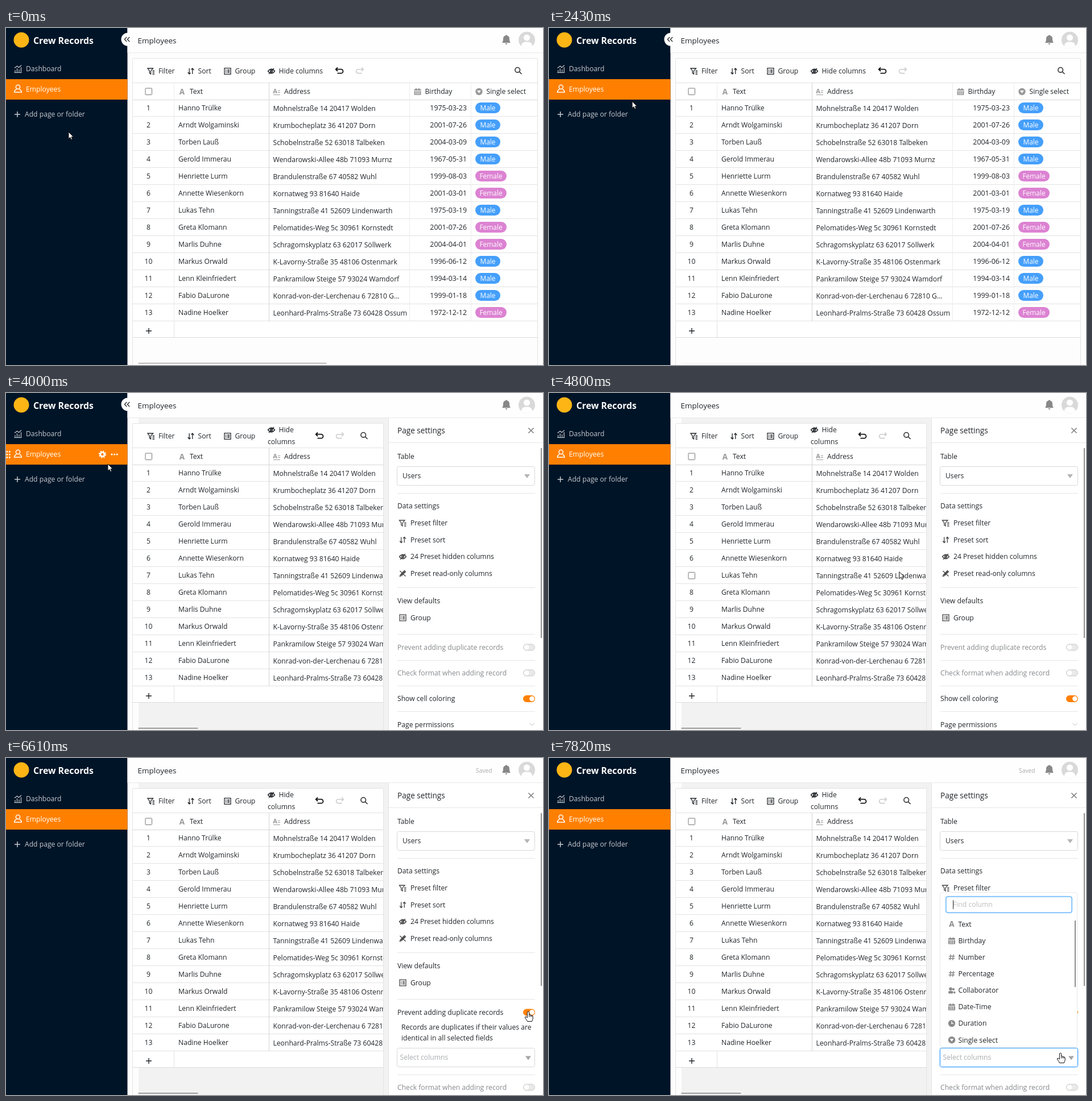
An HTML page with a canvas that plays this animation: 944x593 px, repeating every 8 s.

```html
<!DOCTYPE html>
<html lang="en">
<head>
<meta charset="utf-8">
<title>Page settings</title>
<style>
html, body { margin: 0; width: 100%; height: 100%; overflow: hidden; background: #fff; }
canvas { display: block; width: 944px; height: 593px; }
</style>
</head>
<body>
<canvas id="stage" width="944" height="593"></canvas>
<script>
const W = 944, H = 593, LOOP = 8000;
const canvas = document.getElementById('stage');
const dpr = window.devicePixelRatio || 1;
canvas.width = W * dpr;
canvas.height = H * dpr;
const c = canvas.getContext('2d');

const INK = '#212529', GREY = '#999', LINE = '#e3e3e3', ORANGE = '#ff8000', BLUE = '#2f9bff';
const FONT = '"Open Sans", "Noto Sans", sans-serif';

// name, address, birthday, gender
const ROWS = [
  ['Hanno Trülke', 'Mohnelstraße 14 20417 Wolden', '1975-03-23', 'M'],
  ['Arndt Wolgaminski', 'Krumbocheplatz 36 41207 Dorn', '2001-07-26', 'M'],
  ['Torben Lauß', 'Schobelnstraße 52 63018 Talbeken', '2004-03-09', 'M'],
  ['Gerold Immerau', 'Wendarowski-Allee 48b 71093 Murnz', '1967-05-31', 'M'],
  ['Henriette Lurm', 'Brandulenstraße 67 40582 Wuhl', '1999-08-03', 'F'],
  ['Annette Wiesenkorn', 'Kornatweg 93 81640 Haide', '2001-03-01', 'F'],
  ['Lukas Tehn', 'Tanningstraße 41 52609 Lindenwarth', '1975-03-19', 'M'],
  ['Greta Klomann', 'Pelomatides-Weg 5c 30961 Kornstedt', '2001-07-26', 'F'],
  ['Marlis Duhne', 'Schragomskyplatz 63 62017 Söllwerk', '2004-04-01', 'F'],
  ['Markus Orwald', 'K-Lavorny-Straße 35 48106 Ostenmark', '1996-06-12', 'M'],
  ['Lenn Kleinfriedert', 'Pankramilow Steige 57 93024 Wamdorf', '1994-03-14', 'M'],
  ['Fabio DaLurone', 'Konrad-von-der-Lerchenau 6 72810 G...', '1999-01-18', 'M'],
  ['Nadine Hoelker', 'Leonhard-Pralms-Straße 73 60428 Ossum', '1972-12-12', 'F']
];

const OPTIONS = [
  ['letter', 'Text'], ['calendar', 'Birthday'], ['hash', 'Number'], ['hash', 'Percentage'],
  ['people', 'Collaborator'], ['calendar', 'Date-Time'], ['clock', 'Duration'], ['select', 'Single select']
];

// Stroked icons, centred on 0,0
const ICONS = {
  chart: 'M-6.5 6.5H6.5M-5 6V2M-1.5 6V-1M2 6V1M5.5 6V-3M-6-1.5-1.5-5 1.5-2.5 6-6.5',
  user: 'M3.6-3.2a3.6 3.6 0 1 1-7.2 0a3.6 3.6 0 1 1 7.2 0M-2.5 1Q-6 2-6.3 6H6.3Q6 2 2.5 1',
  filter: 'M-6-5H3.5L-.5-.3V5L-2.7 3.5V-.3ZM2.5-.5H6M2.5 2.2H6M2.5 5H6',
  sort: 'M-2.8-5V4.5M-5.3 2-2.8 5-.5 2.8M2.8 5V-4.5M.5-2.8 2.8-5 5.3-2',
  group: 'M-5.5-5.3H5.5V5.3H-5.5ZM-3.5-2.4H-2M-.5-2.4H3.6M-3.5 0H-2M-.5 0H3.6M-3.5 2.4H-2M-.5 2.4H3.6',
  eye: 'M-6 0Q0-7.5 6 0Q0 7.5-6 0ZM-2 0a2 2 0 1 0 4 0a2 2 0 1 0-4 0M4.5-5-4.5 5',
  pen: 'M-5 5-4 2 3-5 5-3-2 4ZM-5-4.5 5 5M-3 3 4-4',
  undo: 'M-6-2.3H3A3.3 3.3 0 0 1 3 4.6H-3.5M-3-5.5-6.3-2.3-3 1',
  search: 'M3-1.2a4.3 4.3 0 1 1-8.6 0a4.3 4.3 0 1 1 8.6 0M2 2.2 6 6',
  hash: 'M-1.6-5-3 5M3-5 1.6 5M-5-2H5.5M-5.5 2H5',
  close: 'M-4.6-4.6 4.6 4.6M4.6-4.6-4.6 4.6',
  plus: 'M-5 0H5M0-5V5',
  collapse: 'M-.8-4-4.6 0-.8 4M4.2-4 .4 0 4.2 4',
  chevron: 'M-4-2 0 2 4-2'
};
const ARROW = new Path2D('M0 0V12L2.8 9.4 4.6 13.4 6.6 12.5 4.9 8.7H8.6Z');
const HAND = new Path2D('M-1.6 1Q0-1 1.6 1V6Q3 5 4.2 6.5Q5.6 5.8 6.4 7.3Q8 7 8.2 8.6V12Q8 14.5 6.5 17.5H-1.5Q-2.5 15-5.5 11Q-6 9-4 9.2L-1.6 11Z');
for (const k in ICONS) ICONS[k] = new Path2D(ICONS[k]);

const clamp = x => Math.max(0, Math.min(1, x));
const smooth = x => x * x * (3 - 2 * x);
const mix = (a, b, k) => a + (b - a) * k;
const inside = (p, x0, y0, x1, y1) => p.x >= x0 && p.x < x1 && p.y >= y0 && p.y < y1;

function text(s, x, y, color = INK, size = 12.15, align = 'left', weight = 400) {
  c.font = `${weight} ${size}px ${FONT}`;
  c.textAlign = align;
  c.fillStyle = color;
  c.fillText(s, x, y + size * 0.36);
}
function rect(x, y, w, h, color) { c.fillStyle = color; c.fillRect(x, y, w, h); }
function hline(x0, x1, y, color = LINE) { rect(x0, y, x1 - x0, 1, color); }
function vline(x, y0, y1, color = LINE) { rect(x, y0, 1, y1 - y0, color); }
function disc(x, y, r, color) {
  c.fillStyle = color;
  c.beginPath();
  c.arc(x, y, r, 0, 7);
  c.fill();
}
function box(x, y, w, h, r, fill, stroke) {
  c.beginPath();
  c.roundRect(x, y, w, h, r);
  if (fill) { c.fillStyle = fill; c.fill(); }
  if (stroke) { c.strokeStyle = stroke; c.lineWidth = 1; c.stroke(); }
}
function tri(x, y, r, color) {
  c.fillStyle = color;
  c.beginPath();
  c.moveTo(x - r, y - r * 0.6);
  c.lineTo(x + r, y - r * 0.6);
  c.lineTo(x, y + r * 0.8);
  c.fill();
}
function icon(name, x, y, color = INK, lw = 1.3, flip = 1) {
  c.save();
  c.translate(x, y);
  c.scale(flip, 1);
  c.strokeStyle = color;
  c.lineWidth = lw;
  c.stroke(ICONS[name]);
  c.restore();
}
function typeIcon(name, x, y, color = GREY) {
  if (name === 'letter') text('A', x, y, color, 13.5, 'center', 700);
  else if (name === 'long') {
    text('A', x - 3, y - 1, color, 11, 'center', 700);
    hline(x + 2, x + 6, y - 2, color);
    hline(x + 2, x + 6, y + 1, color);
    hline(x - 6, x + 6, y + 5, color);
  } else if (name === 'calendar') {
    box(x - 6, y - 4.5, 12, 10.5, 1, color);
    rect(x - 3.5, y - 6, 2, 3, color);
    rect(x + 1.5, y - 6, 2, 3, color);
    hline(x - 6, x + 6, y - 2, '#fff');
    for (let i = 0; i < 6; i++) rect(x - 4 + i % 3 * 3, y + (i > 2 ? 3 : 0), 2, 1.5, '#fff');
  } else if (name === 'select') {
    disc(x, y, 6.2, color);
    tri(x, y, 3.4, '#fff');
  } else if (name === 'clock') {
    disc(x, y, 6.2, color);
    rect(x - 0.7, y - 4, 1.3, 4.6, '#fff');
    rect(x - 0.7, y - 0.6, 4, 1.3, '#fff');
  } else if (name === 'people') {
    disc(x - 2, y - 2.5, 2.8, color);
    box(x - 6, y + 1, 8.5, 4.5, 2, color);
    disc(x + 3, y - 2, 2.1, color);
    box(x + 3.2, y + 1.5, 3.2, 4, 1.5, color);
  } else icon(name, x, y, color, 1.5);
}
function gear(x, y) {
  c.strokeStyle = '#fff';
  c.lineWidth = 2.8;
  c.beginPath();
  c.arc(x, y, 3.6, 0, 7);
  c.stroke();
  c.lineWidth = 2;
  c.setLineDash([2.3, 2.1]);
  c.beginPath();
  c.arc(x, y, 5.6, 0, Math.PI * 2);
  c.stroke();
  c.setLineDash([]);
}
function toggle(y, on) {
  box(909.5, y - 5.5, 20, 11, 5.5, on > 0.5 ? ORANGE : '#e9e9e9', on > 0.5 ? ORANGE : '#c9c9c9');
  disc(mix(915, 924.5, on), y, 4.4, '#fff');
}
function glowBox(x, y, w, h) {
  box(x - 1, y - 1, w + 2, h + 2, 4, null, '#cfe8ff');
  box(x, y, w, h, 3, '#fff', BLUE);
}

function cursorAt(t) {
  if (t < 1710) return { x: 110, y: 183 };
  if (t < 2500) {
    const k = ((t - 1710) / 790) ** 1.4;
    return { x: mix(111, 151, k), y: mix(181, 122, k) };
  }
  if (t < 4000) {
    const k = 1 - (1 - clamp((t - 2500) / 280)) ** 2;
    return { x: mix(151, 170, k), y: mix(122, 105, k) };
  }
  if (t < 6870) {
    const k = smooth(clamp((t - 4000) / 1650) ** 0.8);
    return { x: mix(179, 918, k), y: mix(125, 446, k) };
  }
  const k = smooth(clamp((t - 6850) / 560));
  return { x: mix(918, 899, k), y: mix(446, 519, k) };
}
function drawCursor(t, p) {
  const hand = inside(p, 162, 100, 178, 117) && t < 4000 ||
    t >= 5650 && inside(p, 908, 438, 932, 456) ||
    t >= 6800 && inside(p, 687, 510, 930, 545);
  c.save();
  c.translate(p.x, p.y);
  c.fillStyle = '#fff';
  c.strokeStyle = '#111';
  c.lineWidth = 1;
  c.lineJoin = 'round';
  c.fill(hand ? HAND : ARROW);
  c.stroke(hand ? HAND : ARROW);
  if (hand) for (const x of [1.6, 4, 6.2]) vline(x - 0.4, 6.5, 9.5, '#111');
  c.restore();
}
function panelWidth(t) {
  return t < 3370 ? 0 : t < 3430 ? 21 : t < 3520 ? 120 : t < 3610 ? 230 : 271;
}

function drawSidebar(p) {
  const soft = '#c6cad0';
  rect(0, 0, 213.5, H, '#001427');
  disc(27, 21, 13.5, '#fdb515');
  text('Crew Records', 48, 22, '#fff', 15.8, 'left', 700);
  icon('chart', 21, 72, soft, 1.2);
  text('Dashboard', 35, 72, soft);
  rect(0, 90, 213.5, 36, ORANGE);
  icon('user', 21, 107, '#fff', 1.5);
  text('Employees', 35, 108, '#fff');
  icon('plus', 20, 152, soft, 1.5);
  text('Add page or folder', 33, 152, soft);
  if (inside(p, 0, 90, 213, 126)) {
    for (let i = 0; i < 6; i++) rect(i % 2 * 4.5 + 0.5, 102 + (i >> 1) * 5, 2.6, 2.6, '#fff');
    gear(169.5, 108);
    for (let i = 0; i < 3; i++) disc(186 + i * 4.6, 108, 1.6, '#fff');
  }
}

function drawHeader(t, p) {
  rect(213.5, 0, W, 43, '#fefefe');
  hline(213.5, W, 43, '#e9e9e9');
  text('Employees', 231.5, 22, INK, 13.5);
  if (t >= 6280) text('Saved', 826, 22, '#a9a9a9', 10.3);
  c.fillStyle = '#888';
  c.fill(new Path2D('M872 26Q874 24 874 19Q874 14 878 13.5V12.5H881V13.5Q885 14 885 19Q885 24 887 26ZM877.5 27H881.5Q881 29 879.5 29Q878 29 877.5 27'));
  c.save();
  c.beginPath();
  c.arc(915.5, 21, 14.5, 0, 7);
  c.clip();
  rect(900, 6, 32, 32, '#d9d9d9');
  disc(915.5, 17, 5.6, '#fff');
  box(906, 24.5, 19, 14, 7, '#fff');
  c.restore();
  if (p.x < 224) {
    disc(214, 20, 11.5, '#fff');
    icon('collapse', 213, 20, '#222', 1.2);
  }
}

function drawToolbar(right) {
  const tight = right < 700;
  icon('filter', 255, 76);
  text('Filter', 268, 76);
  icon('sort', 325, 76);
  text('Sort', 337.5, 76);
  icon('group', 389.5, 76);
  text('Group', 402.5, 76);
  icon('eye', 466.5, tight ? 65 : 76);
  if (tight) {
    text('Hide', 479.5, 65);
    text('columns', 460, 85.5);
  } else text('Hide columns', 479.5, 76);
  icon('undo', tight ? 551 : 586, 75, '#111', 1.8);
  icon('undo', tight ? 587 : 622, 75, '#ccc', 1.6, -1);
  icon('search', right - 33.5, 75, '#333', 1.6);
}

function drawTable(t, w, p) {
  const right = 934 - w;
  rect(213.5, 44, W, H, '#fdfdfd');
  if (w) rect(233, 44, W, H, '#f2f2f2');
  rect(223, 53, right - 223, 492, '#fff');
  c.save();
  c.beginPath();
  c.rect(222, 53, right - 222, H);
  c.clip();
  drawToolbar(right);
  hline(223, right, 53);
  hline(223, right, 96);
  hline(223, right, 126, '#d8d8d8');
  box(245, 106, 11.5, 11.5, 1, '#fff', '#777');
  [['letter', 309.5, 'Text', 323], ['long', 476, 'Address', 489],
   ['calendar', 723.5, 'Birthday', 736.5], ['select', 831.5, 'Single select', 844.5]]
    .forEach(([kind, x, label, tx]) => {
      typeIcon(kind, x, 112);
      text(label, tx, 112);
    });
  const over = inside(p, 223, 126, right, 516) ? Math.floor((p.y - 126) / 30) : -1;
  ROWS.forEach(([name, address, day, sex], i) => {
    const y = 141 + i * 30;
    if (i === over) box(245, y - 5.5, 11.5, 11.5, 1, '#fff', '#777');
    else text(i + 1, 250.5, y, INK, 12.15, 'center');
    text(name, 303, y);
    text(address, 469.5, y + 0.5);
    text(day, 810, y, INK, 12.4, 'right');
    const male = sex === 'M', pw = male ? 44 : 55;
    box(825, y - 10, pw, 19, 9.5, male ? '#459ffb' : '#dc82d2');
    text(male ? 'Male' : 'Female', 825 + pw / 2, y, '#fff', 11.9, 'center');
    hline(223, right, y + 14);
  });
  if (!w) for (const x of [295, 709, 817]) vline(x, 97, 516, '#ececec');
  vline(462, 97, 516, '#d3d3d3');
  vline(295, 516, 544);
  icon('plus', 251, 533, INK, 1.4);
  hline(223, right, 544, '#dcdcdc');
  const fade = w ? 1 : mix(1, 0.12, clamp(t / 180));
  rect(232.5, 589, (620 - w) ** 2 / 1162, 1.7, w ? '#8c8c8c' : `rgba(175,175,175,${fade})`);
  c.restore();
  vline(222, 54, H);
  vline(right, 54, H);
}

function drawPopup(t) {
  const k = 1 - (1 - clamp((t - 7560) / 240)) ** 3;
  c.save();
  c.globalAlpha = k;
  c.translate(0, 510);
  c.scale(1, mix(0.8, 1, k));
  c.translate(0, -510);
  box(687.5, 236.5, 241, 273, 3, '#fff', '#e9e9e9');
  glowBox(698, 244, 221, 28);
  vline(710, 250, 266, '#333');
  text('Find column', 710, 258, '#bdbdbd');
  OPTIONS.forEach(([kind, label], i) => {
    const y = 292.5 + i * 29.1;
    typeIcon(kind, 708, y, '#8a8a8a');
    text(label, 719.5, y);
  });
  rect(924, 286, 2, 117, '#8c8c8c');
  c.restore();
}

function drawPanel(t, w, p) {
  const left = W - w, x = left + 15;
  const open = t >= 6340, dy = open ? 87 : 0;
  const dim = '#85888c';
  const rule = y => hline(x, 930, y, '#e6e6e6');
  c.save();
  c.beginPath();
  c.rect(left - 1, 44, w + 1, H);
  c.clip();
  rect(left, 44, w, H, '#fff');
  vline(left - 1, 44, H, '#e3e3e3');
  text('Page settings', x, 66, INK, 13.6);
  icon('close', Math.max(923, left + 8), 66, '#777', 1.4);
  hline(left, W, 87, '#e6e6e6');
  text('Table', x, 112);
  if (w > 30) {
    box(x - 0.5, 129.5, 930 - x, 33, 3, '#fff', '#d8d8d8');
    text('Users', x + 9, 146);
    tri(916, 146, 5, '#b5b5b5');
  }
  rule(176);
  text('Data settings', x, 199);
  [['filter', 'Preset filter'], ['sort', 'Preset sort'], ['eye', '24 Preset hidden columns'], ['pen', 'Preset read-only columns']]
    .forEach(([kind, label], i) => {
      const y = 229 + i * 29.5;
      icon(kind, x + 9.5, y, '#444');
      text(label, x + 23, y);
    });
  rule(342);
  text('View defaults', x, 366);
  icon('group', x + 9.5, 395.5, '#444');
  text('Group', x + 23, 395.5);
  rule(424);
  const on = clamp((t - 6260) / 200);
  text('Prevent adding duplicate records', x, 448, on ? INK : dim);
  if (open) {
    text('Records are duplicates if their values are', x + 7, 474);
    text('identical in all selected fields', x + 7, 493);
    if (t >= 7580) glowBox(687.5, 510.5, 242, 33);
    else box(687.5, 510.5, 242, 33, 3, '#fff', inside(p, 687, 510, 930, 545) ? BLUE : '#d8d8d8');
    text('Select columns', 692.5, 527, '#a8abae');
    tri(918, 527.5, 5, '#a5a5a5');
  }
  rule(470 + dy);
  text('Check format when adding record', x, 493 + dy, dim);
  rule(515 + dy);
  text('Show cell coloring', x, 538 + dy);
  rule(560 + dy);
  text('Page permissions', x, 584 + dy);
  if (w > 60) {
    toggle(447.5, on);
    toggle(492.5 + dy, 0);
    toggle(538 + dy, 1);
    icon('chevron', 924.5, 583 + dy, '#bbb', 1);
  }
  rect(940, 97, 2, open ? 304 : 334, '#8c8c8c');
  if (t >= 7580) drawPopup(t);
  c.restore();
}

function draw(t) {
  const p = cursorAt(t), w = panelWidth(t);
  c.setTransform(dpr, 0, 0, dpr, 0, 0);
  rect(0, 0, W, H, '#fff');
  drawTable(t, w, p);
  if (w) drawPanel(t, w, p);
  drawSidebar(p);
  drawHeader(t, p);
  drawCursor(t, p);
}

const start = performance.now();
function tick() {
  draw((performance.now() - start) % LOOP);
  requestAnimationFrame(tick);
}
tick();
</script>
</body>
</html>
```
